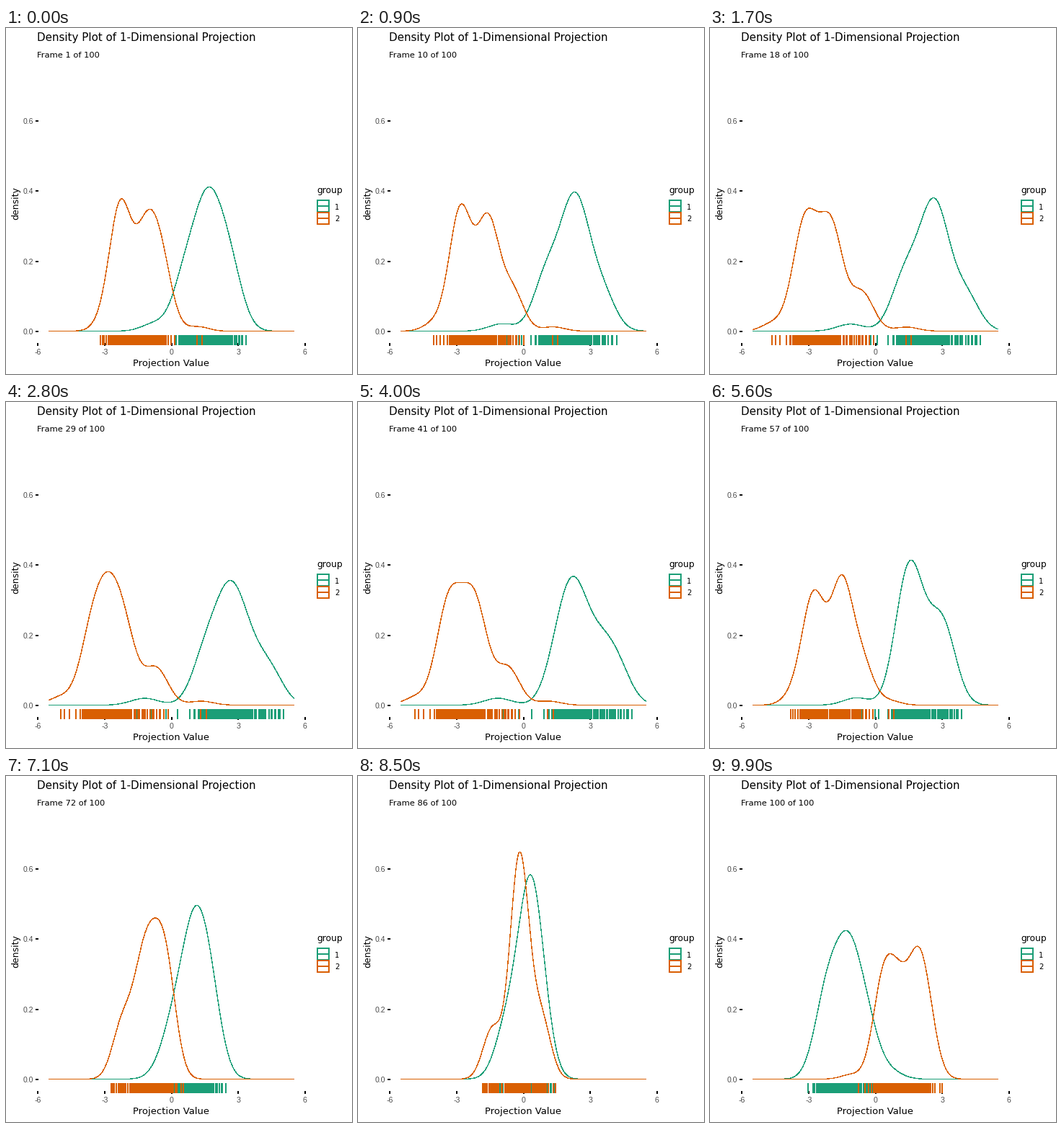
A matplotlib script for the animation above (10 s loop, 480 by 480 pixels).

```python
import numpy as np
import matplotlib.pyplot as plt
from matplotlib.animation import FuncAnimation

SIZE, DPI, FRAMES = 480, 100, 100
GREEN, ORANGE, INK, GREY = "#1B9E77", "#D95F02", "black", "#4D4D4D"
GRID = np.linspace(-5.5, 5.5, 512)

# Clusters of each group as (weight, x, y); the view axis rotates around them.
GROUP_1 = [(.03, -1.2, .05), (.18, 2.6, -.9), (.22, 1.6, .4),
           (.22, 2.5, 0), (.20, 3.4, .5), (.15, 4.4, -.1)]
GROUP_2 = [(.015, 1.3, -.5), (.14, -.7, -.1), (.15, -2.9, -1.25),
           (.18, -2.8, .95), (.25, -3.6, 0), (.24, -2.1, -.05), (.03, -5, 0)]


def px(v):
    return 229.5 + 30.9 * v


def py(d):
    return 420.5 - 487 * d


def view_angle(frame):
    """Steady turn from one chosen view to the next."""
    return np.radians(np.interp(frame, [0, 71, 85, 99], [-53, 68, 87, 120]))


def project(clusters, core, angle):
    """Weights, centres and common spread of the clusters seen along one axis."""
    w, x, y = np.array(clusters).T
    return w / w.sum(), x * np.cos(angle) + y * np.sin(angle), np.hypot(core, .33 * np.cos(angle))


def density(w, centre, spread):
    z = (GRID[:, None] - centre) / spread
    return np.exp(-z * z / 2) @ w / (spread * np.sqrt(2 * np.pi))


def rug_points(w, centre, spread, ranks):
    cdf = np.cumsum(density(w, centre, .75 * spread) + 1e-9)
    return np.interp(ranks, cdf / cdf[-1], GRID)


fig = plt.figure(figsize=(SIZE / DPI, SIZE / DPI), dpi=DPI, facecolor="white")
ax = fig.add_axes([0, 0, 1, 1])
ax.set_xlim(0, SIZE)
ax.set_ylim(SIZE, 0)
ax.axis("off")


def label(x, y, text, size, color=INK, font="DejaVu Sans", **kw):
    return ax.text(x, y, text, fontsize=size * 72 / DPI, color=color,
                   family=font, va="baseline", **kw)


def line(xs, ys, color, **kw):
    # Aliased strokes fill every pixel they touch, so a thin one is 1 px wide.
    return ax.plot(xs, ys, color=color, lw=.3 * 72 / DPI, antialiased=False, **kw)[0]


label(43, 18, "Density Plot of 1-Dimensional Projection", 15.1)
subtitle = label(43, 41, "", 11.5)
label(228.5, 469, "Projection Value", 13.1, ha="center")
label(17, 243, "density", 12.5, ha="center", rotation=90, rotation_mode="anchor")

for v in range(-6, 7, 3):
    label(px(v), 453, str(v), 10.5, GREY, "Liberation Sans", ha="center")
    line([round(px(v)) - .5] * 2, [437.5, 439.5], INK)
for d in np.arange(4) * .2:
    label(38.5, py(d) + 4.5, f"{d:.1f}", 10.5, GREY, "Liberation Sans", ha="right")
    line([41.5, 43.5], [int(py(d)) + .5] * 2, INK)

label(431.5, 229, "group", 12.4)
groups = []
rng = np.random.default_rng(7)
for k, (color, clusters, core) in enumerate([(GREEN, GROUP_1, .52), (ORANGE, GROUP_2, .42)]):
    left, top, side = 431.5, 238.5 + 17 * k, 16
    line(left + side * np.array([0, 1, 1, 0, 0]), top + side * np.array([0, 0, 1, 1, 0]), color)
    line([left, left + side], [top + side / 2] * 2, color)
    label(456, top + 13, str(k + 1), 10)
    ranks = (np.arange(100) + rng.uniform(-.3, 1.3, 100)).clip(.4, 99.6) / 100
    groups.append((clusters, core, ranks, line([], [], color, zorder=3 + k),
                   line([], [], color, zorder=5 + k)))


def draw(frame):
    subtitle.set_text(f"Frame {frame + 1} of {FRAMES}")
    for clusters, core, ranks, curve, rug in groups:
        shape = project(clusters, core, view_angle(frame))
        curve.set_data(px(GRID), py(density(*shape)))
        x = np.floor(px(rug_points(*shape, ranks))) + .5
        gap = np.full_like(x, np.nan)
        rug.set_data(np.column_stack([x, x, gap]).ravel(),
                     np.tile([426.5, 438.5, np.nan], len(x)))
    return [subtitle]


anim = FuncAnimation(fig, draw, frames=FRAMES, interval=100,
                     repeat=True, repeat_delay=0, blit=False)
plt.show()
```
